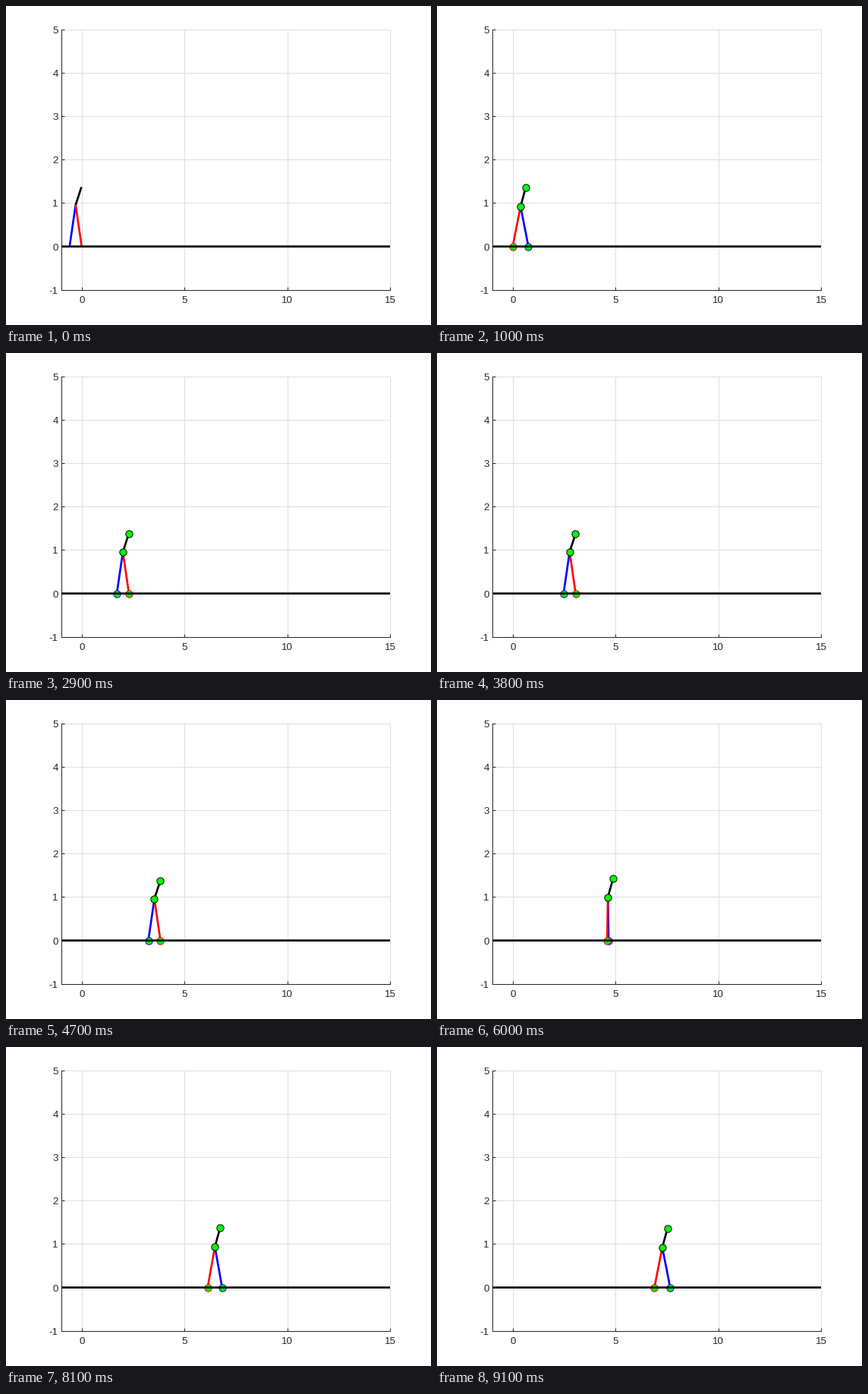
A matplotlib script that plays this animation: 560x420 px, repeating every 9200 ms.

```python
import numpy as np
import matplotlib.pyplot as plt
from matplotlib.animation import FuncAnimation

DPI = 100
W, H = 560, 420
FRAMES, INTERVAL = 92, 100

STEP_FRAMES = 9
MAX_LEAN = np.pi / 8              # leg angle at foot strike
STRIDE = 2 * np.sin(MAX_LEAN)
TORSO = 0.5
INK = "#262626"


def px(n):
    """Pixels to points."""
    return n * 72 / DPI


def pose(frame):
    """Stance foot, hip, swing foot and torso tip as (x, y) points."""
    tick = frame - 2 if frame > 3 else max(frame - 1, 0)
    step, j = divmod(tick, STEP_FRAMES)
    leg = min(-0.058 + 0.245 * np.sinh(0.31 * (j - 2.8)), MAX_LEAN)
    lean = np.pi / 6 + 0.075 * np.exp(-j / 2)
    stance = np.array([step * STRIDE, 0.0])
    hip = stance + [np.sin(leg), np.cos(leg)]
    swing = stance + [2 * np.sin(leg), 0.0]
    head = hip + TORSO * np.array([np.sin(lean), np.cos(lean)])
    return stance, hip, swing, head


fig = plt.figure(figsize=(W / 100, H / 100), dpi=DPI, facecolor="white")
ax = fig.add_axes([72.6 / W, 46.2 / H, 433.8 / W, 343 / H])
ax.set(xlim=(-1, 15), ylim=(-1, 5), xticks=range(0, 16, 5), yticks=range(-1, 6))
ax.set_axisbelow(True)
ax.tick_params(direction="in", length=px(4), width=px(1), color=INK,
               labelbottom=False, labelleft=False)
ax.grid(color="#dfdfdf", linewidth=px(1))
for line in ax.get_xgridlines() + ax.get_ygridlines():
    line.set_clip_on(False)
for side, spine in ax.spines.items():
    spine.set(color=INK, linewidth=px(1), visible=side in ("left", "bottom"))


def label(value, at, offset, ha):
    ax.annotate(str(value), at, xytext=offset, textcoords="offset pixels",
                ha=ha, va="baseline", color=INK, fontsize=px(13.33),
                fontfamily="Liberation Sans", annotation_clip=False)


for x in range(0, 16, 5):
    label(x, (x, -1), (0, -17), "center")
for y in range(-1, 6):
    label(y, (-1, y), (-4, -5), "right")


def limb(color, z):
    return ax.plot([], [], color=color, lw=px(2.67), zorder=z,
                   solid_capstyle="butt", snap=False)[0]


def joint(edge, z):
    return ax.plot([], [], "o", ms=px(9.3), mfc="#00ff00", mec=edge,
                   mew=px(1), zorder=z)[0]


swing_leg, stance_leg, torso = limb("blue", 3), limb("red", 4), limb("black", 5)
swing_foot, stance_foot = joint("blue", 3.5), joint("red", 4.5)
body = joint("black", 6)
ground = limb("black", 5.5)
ground.set_data([-1, 15], [0, 0])


def join(artist, *points):
    artist.set_data(*np.transpose(points))


def update(frame):
    stance, hip, swing, head = pose(frame)
    join(swing_leg, hip, swing)
    join(stance_leg, hip, stance)
    join(torso, hip, head)
    join(swing_foot, swing)
    join(stance_foot, stance)
    join(body, hip, head)
    for marker in (swing_foot, stance_foot, body):
        marker.set_visible(frame > 0)
    return swing_leg, stance_leg, torso, swing_foot, stance_foot, body


anim = FuncAnimation(fig, update, frames=FRAMES, interval=INTERVAL,
                     repeat=True, repeat_delay=0, blit=False)
plt.show()
```
